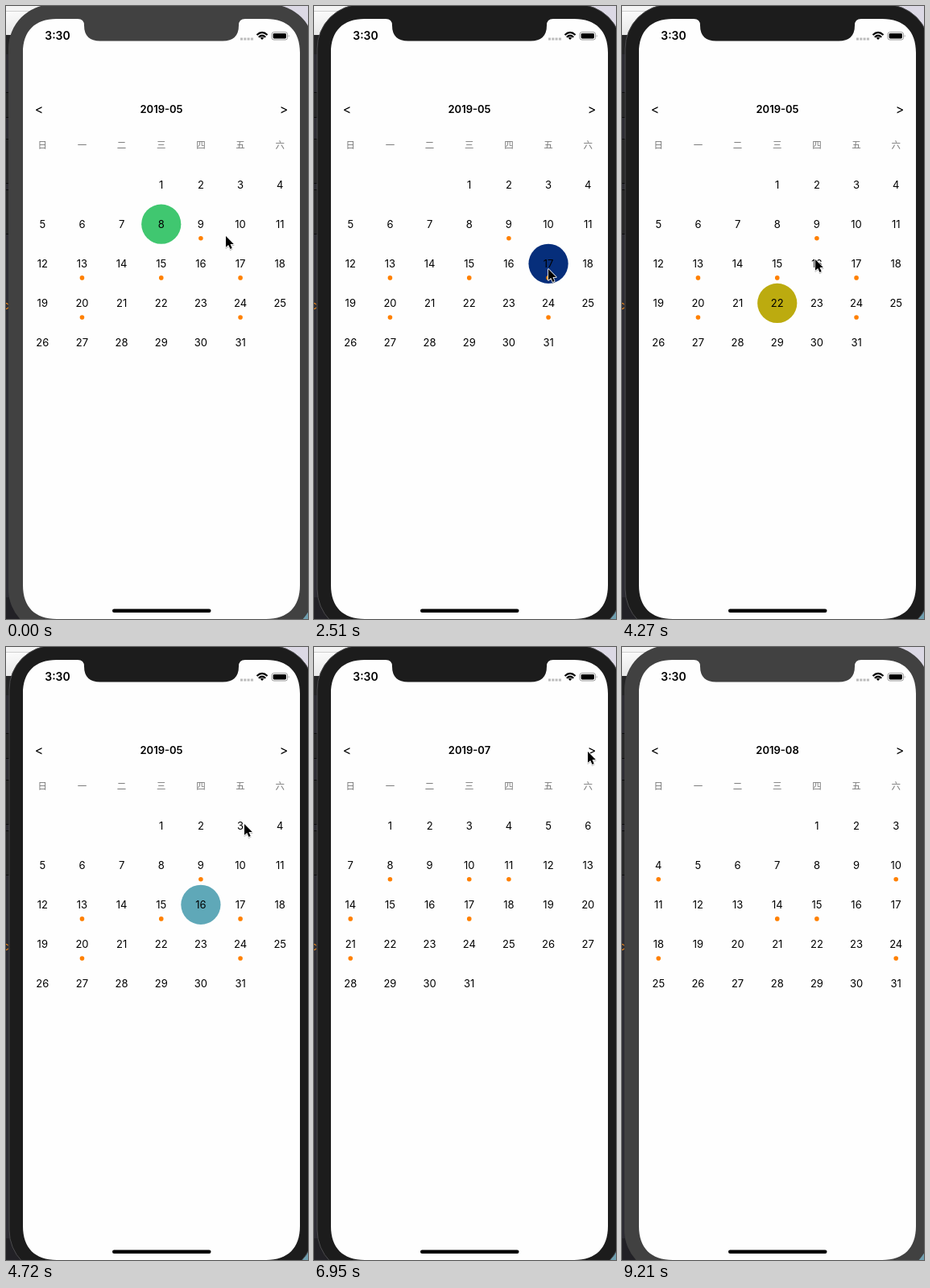
These frames come from a looping animation (375x762 px, 9310 ms). An HTML page:

```html
<!DOCTYPE html>
<html lang="zh">
<head>
<meta charset="utf-8">
<title>Calendar</title>
<style>
  html, body { margin: 0; width: 100%; height: 100%; overflow: hidden; background: #fff; }
  svg { display: block; width: 375px; height: 762px; }
  text { font-family: Inter, Roboto, sans-serif; font-size: 13px; text-anchor: middle; fill: #000; }
  .bold { font-weight: 600; }
  .weekday { font: 300 11.5px "Noto Sans CJK SC", "Noto Sans CJK", sans-serif; fill: #777; }
  .arrow { font-size: 16px; }
  .clock { font-size: 14px; }
</style>
</head>
<body>
<svg id="stage" viewBox="0 0 375 762" xmlns="http://www.w3.org/2000/svg">
  <defs>
    <filter id="soft" x="-50%" y="-50%" width="200%" height="200%">
      <feDropShadow dx="0" dy="1" stdDeviation=".7" flood-opacity=".35"/>
    </filter>
    <linearGradient id="corner" x2="1" y2="1">
      <stop stop-color="#fff"/><stop offset="1" stop-color="#d2d2d2"/>
    </linearGradient>
  </defs>

  <g id="desktop">
    <rect width="375" height="762" fill="#2d2c33"/>
    <rect width="375" height="36" fill="url(#corner)"/>
    <rect width="60" height="6" fill="#f4f4f4"/>
    <path d="M0 6.5H40" stroke="#d0d0d0"/>
    <rect y="36" width="30" height="24" fill="#252526"/>
    <g fill="#282829" stroke="#0c0c0c">
      <rect x="-5" y="107.5" width="9" height="31"/>
      <rect x="-5" y="165.5" width="9" height="55"/>
      <rect x="-5" y="228.5" width="9" height="55"/>
    </g>
    <text x="0" y="377" fill="#f28a1c" style="fill:#f28a1c">c</text>
    <rect y="735" width="40" height="27" fill="#222126"/>
    <rect x="320" width="55" height="50" fill="#dcd9e5"/>
    <rect x="340" y="720" width="35" height="42" fill="#6f9fb0"/>
  </g>

  <rect id="bezel" y="-2" height="782" rx="55"/>
  <path d="M63 16H89Q97 16 97 24Q97 43.500 117 43.500H269Q289 43.500 289 24Q289 16 297 16H323
           C350 16 365 31 365 58V720C365 747 350 762 323 762H63C36 762 21 747 21 720V58C21 31 36 16 63 16Z" fill="#fefefe"/>

  <text class="bold clock" x="64" y="42">3:30</text>
  <path d="M291 41H307" stroke="#bbb" stroke-width="3" stroke-dasharray="3 1.300"/>
  <g fill="none" stroke="#000" stroke-width="2.200">
    <path d="M311.500 36Q318 29.800 324.500 36M313.800 38.700Q318 34.800 322.200 38.700"/>
    <path d="M315.800 39.700Q318 38 320.200 39.700L318 42Z" fill="#000" stroke="none"/>
  </g>
  <rect x="330" y="32.500" width="19.500" height="9.500" rx="2.600" fill="none" stroke="#999"/>
  <rect x="331.600" y="34" width="16.300" height="6.500" rx="1.400"/>
  <path d="M350.800 35.500Q352.500 37.200 350.800 39Z" fill="#888"/>

  <text class="arrow" x="41" y="134">&lt;</text>
  <text class="arrow" x="345" y="134">&gt;</text>
  <text id="title" class="bold" x="193" y="132.700"></text>
  <g id="weekdays"></g>
  <circle id="selection" r="24.600"/>
  <g id="days"></g>
  <rect x="132" y="749.500" width="122.500" height="4.500" rx="2.250"/>
  <path id="cursor" d="M0 0V13.800L3.200 10.900L5.500 16L7.700 15L5.500 10H9.800Z"
        stroke="#fff" stroke-width="1.600" stroke-linejoin="round" paint-order="stroke" filter="url(#soft)"/>
</svg>
<script>
const LOOP = 9310, CELL = 49.15;
const $ = id => document.getElementById(id);
const colX = col => 45.3 + CELL * col;
const rowY = row => 222 + CELL * row;

// Month number: first weekday, length, marked days.
const MONTHS = {
  5: { first: 3, length: 31, marks: [9, 13, 15, 17, 20, 24] },
  6: { first: 6, length: 30, marks: [6, 10, 12, 15, 18, 23] },
  7: { first: 1, length: 31, marks: [8, 10, 11, 14, 17, 21] },
  8: { first: 4, length: 31, marks: [4, 10, 14, 15, 18, 24] }
};

// Timed states: [start, value...]; the last one reached applies.
const MONTH_CHANGES = [[0, 5], [6050, 6], [6950, 7], [8000, 8]];
const SELECTIONS = [
  [0, 8, "#40c770"], [2355, 17, "#062e7b"], [3380, 22, "#bcab0f"],
  [4420, 16, "#5fa8b8"], [5020, 3, "#e876b5"], [6050, 0, "none"]
];
const FOCUS = [[0, false], [2060, true], [9210, false]];

// Pointer moves, sampled in even steps; path points are [progress, x, y].
const MOVES = [
  { from: 0, to: 0, steps: 1, path: [[0, 273, 286]] },
  { from: 140, to: 1180, steps: 8, path: [[0, 272, 286], [.35, 310, 215], [.7, 356, 122], [1, 346, 130]] },
  { from: 1620, to: 2650, steps: 8, path: [[0, 298, 199], [.43, 293, 318], [.6, 291, 327], [.86, 291, 327], [1, 236, 324]] },
  { from: 2800, to: 2940, steps: 2, path: [[0, 212, 335], [1, 193, 345]] },
  { from: 3240, to: 4270, steps: 8, path: [[0, 193, 355], [.4, 194, 361], [.6, 205, 350], [1, 240, 315]] },
  { from: 4420, to: 4720, steps: 3, path: [[0, 241, 316], [.5, 268, 270], [1, 296, 220]] },
  { from: 5020, to: 5600, steps: 5, path: [[0, 294, 221], [.25, 300, 205], [.75, 346, 136], [1, 340, 131]] },
  { from: 6650, to: 6650, steps: 1, path: [[0, 340, 130]] },
  { from: 8000, to: 8600, steps: 5, path: [[0, 340, 130], [.25, 336, 190], [1, 276, 759]] }
];
const POINTER_EXIT = 8900;

const stateAt = (list, t) => list.filter(s => s[0] <= t).pop();

function pointerAt(t) {
  const { from, to, steps, path } = MOVES.filter(m => m.from <= t).pop();
  const step = steps > 1 ? Math.floor((t - from) / (to - from) * (steps - 1) + .06) : 0;
  const p = steps > 1 ? Math.min(1, step / (steps - 1)) : 0;
  const next = path.findIndex(k => k[0] >= p);
  const b = path[next], a = path[Math.max(0, next - 1)];
  const mix = a === b ? 0 : (p - a[0]) / (b[0] - a[0]);
  return [a[1] + (b[1] - a[1]) * mix, a[2] + (b[2] - a[2]) * mix];
}

function add(parent, tag, attrs, content = "") {
  const el = document.createElementNS("http://www.w3.org/2000/svg", tag);
  setAttrs(el, attrs);
  el.textContent = content;
  parent.append(el);
}

function setAttrs(el, attrs) {
  for (const key in attrs) el.setAttribute(key, attrs[key]);
}

function cellOf(month, day) {
  const index = MONTHS[month].first + day - 1;
  return [colX(index % 7), rowY(Math.floor(index / 7))];
}

let shownMonth;
function showMonth(month) {
  if (month === shownMonth) return;
  shownMonth = month;
  $("title").textContent = `2019-0${month}`;
  $("days").replaceChildren();
  for (let day = 1; day <= MONTHS[month].length; day++) {
    const [x, y] = cellOf(month, day);
    add($("days"), "text", { x, y: y + 4.7 }, day);
    if (MONTHS[month].marks.includes(day))
      add($("days"), "circle", { cx: x, cy: y + 17.6, r: 2.8, fill: "#ff8000" });
  }
}

function draw(t) {
  const month = stateAt(MONTH_CHANGES, t)[1];
  showMonth(month);

  const [, day, color] = stateAt(SELECTIONS, t);
  const [cx, cy] = cellOf(month, day || 1);
  setAttrs($("selection"), { cx, cy, fill: color });

  const focused = stateAt(FOCUS, t)[1];
  setAttrs($("bezel"), focused
    ? { x: 4, width: 378, fill: "#1c1c1c", stroke: "#4b4b4d" }
    : { x: 3, width: 380, fill: "#414141", stroke: "none" });

  const [x, y] = pointerAt(t);
  setAttrs($("cursor"), {
    transform: `translate(${x} ${y})`,
    visibility: t < POINTER_EXIT ? "visible" : "hidden"
  });
}

[..."日一二三四五六"].forEach((name, i) =>
  add($("weekdays"), "text", { class: "weekday", x: colX(i), y: 177.3 }, name));

const start = performance.now();
function tick() {
  draw((performance.now() - start) % LOOP);
  requestAnimationFrame(tick);
}
tick();
</script>
</body>
</html>
```
